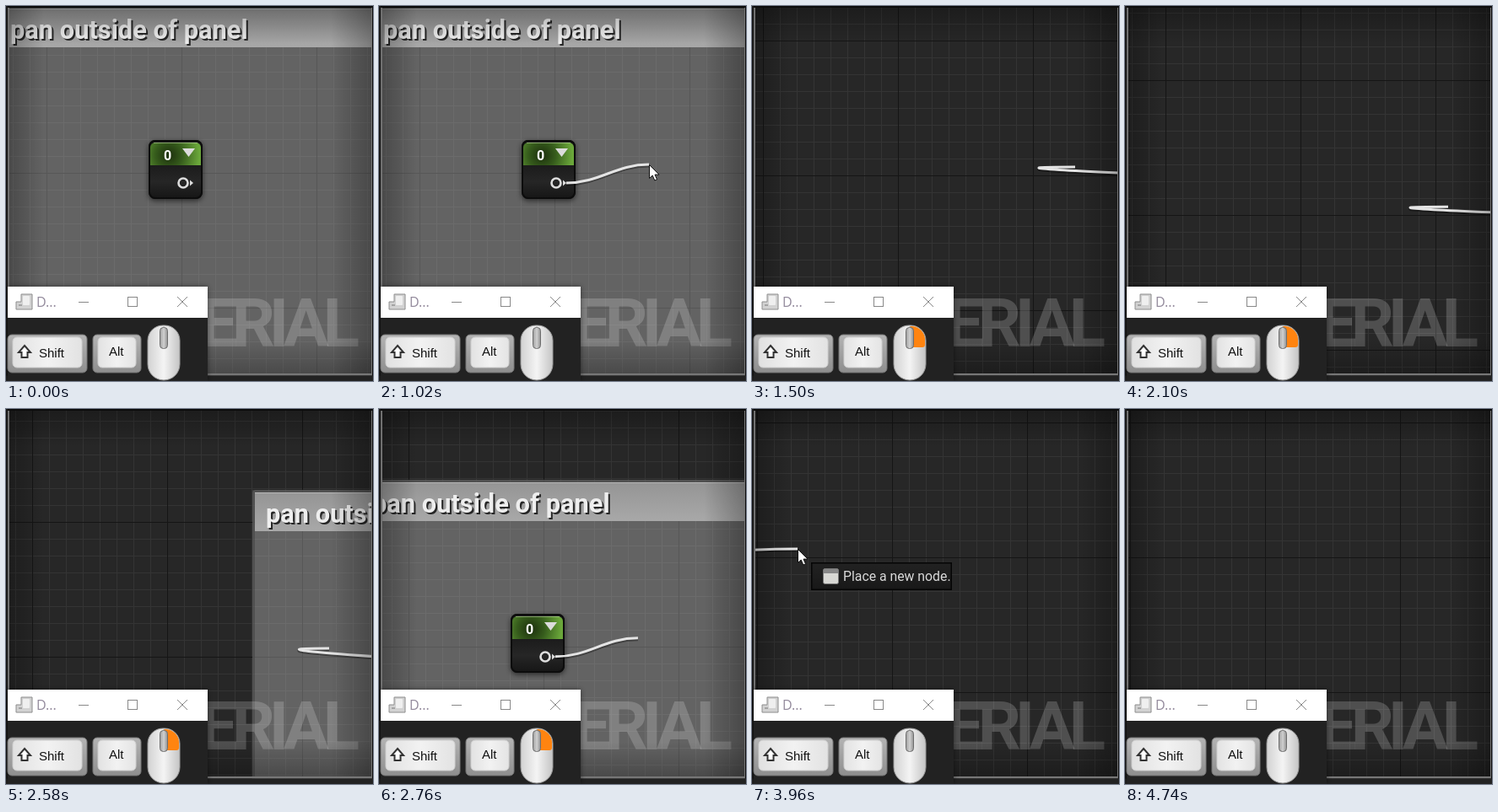
Animation of 435 by 445 pixels, one loop 5340 ms. Source, as an HTML page with a canvas:

```html
<!DOCTYPE html>
<html lang="en">
<head>
<meta charset="utf-8">
<title>Panning with an open wire</title>
<style>
html, body { margin: 0; width: 100%; height: 100%; overflow: hidden; background: #111; }
canvas { display: block; }
</style>
</head>
<body>
<canvas id="stage" width="435" height="445"></canvas>
<script>
const ctx = document.getElementById('stage').getContext('2d');
const LOOP = 5340, STEP = 60;
const VIEW = { left: 4, top: 2, right: 433, bottom: 436 };
const PIN = { x: 222, y: 210 }, DROP = { x: 320, y: 188 };

// Keys are [time, x, y].
const PAN = [[1080, 0, 0], [1500, 445, 3], [1920, 520, 40], [2580, 303, 96],
  [3000, -500, 65], [3360, -530, -10], [3540, -530, -10], [3600, -522, -22]];
const CURSOR_IN = [[60, 428, 71], [480, 214, 210], [720, 214, 210], [1020, 320, 188]];
const CURSOR_OUT = [[3960, 54, 166], [4260, 144, 156], [4680, 183, 107]];

const between = (t, a, b) => t >= a && t < b;
const clamp = (v, lo, hi) => Math.min(hi, Math.max(lo, v));

function follow(keys, t) {
  const next = keys.findIndex(k => k[0] > t);
  if (next < 1) {
    const [, x, y] = next ? keys[keys.length - 1] : keys[0];
    return { x, y };
  }
  const [t0, x0, y0] = keys[next - 1], [t1, x1, y1] = keys[next];
  const u = (t - t0) / (t1 - t0), e = u * u * (3 - 2 * u);
  return { x: x0 + (x1 - x0) * e, y: y0 + (y1 - y0) * e };
}

function rect(x, y, w, h, fill) {
  ctx.fillStyle = fill;
  ctx.fillRect(x, y, w, h);
}

function box(x, y, w, h, r, fill, stroke, width = 1) {
  ctx.beginPath();
  ctx.roundRect(x, y, w, h, r);
  if (fill) { ctx.fillStyle = fill; ctx.fill(); }
  if (stroke) { ctx.strokeStyle = stroke; ctx.lineWidth = width; ctx.stroke(); }
}

function poly(points, fill, stroke, width = 1) {
  ctx.beginPath();
  for (let i = 0; i < points.length; i += 2) ctx.lineTo(points[i], points[i + 1]);
  ctx.closePath();
  if (fill) { ctx.fillStyle = fill; ctx.fill(); }
  if (stroke) { ctx.strokeStyle = stroke; ctx.lineWidth = width; ctx.stroke(); }
}

function line(x0, y0, x1, y1, color, width = 1) {
  ctx.beginPath();
  ctx.moveTo(x0, y0);
  ctx.lineTo(x1, y1);
  ctx.strokeStyle = color;
  ctx.lineWidth = width;
  ctx.stroke();
}

function text(str, x, y, font, color) {
  ctx.font = font;
  ctx.fillStyle = color;
  ctx.fillText(str, x, y);
}

function blend(x0, y0, x1, y1, ...colors) {
  const g = ctx.createLinearGradient(x0, y0, x1, y1);
  colors.forEach((c, i) => g.addColorStop(i / (colors.length - 1), c));
  return g;
}

function grid(pan) {
  rect(0, 0, 435, 445, '#272727');
  const wrap = (v, n) => ((Math.round(v) % n) + n) % n;
  for (const [gap, color] of [[20, '#343434'], [160, '#151515']]) {
    for (let x = wrap(208 + pan.x, gap); x < 435; x += gap) rect(x, 0, 1, 445, color);
    for (let y = wrap(198 + pan.y, gap); y < 445; y += gap) rect(0, y, 435, 1, color);
  }
}

function comment() {
  box(-11, 0, 500, 480, 4, 'rgba(200,200,200,.37)');
  ctx.lineWidth = 3;
  ctx.strokeStyle = 'rgba(70,70,70,.6)';
  ctx.strokeRect(-9.5, 1.5, 497, 477);
  rect(-8, 3, 494, 46, blend(0, 3, 0, 49, '#959595', '#a8a8a8'));
  rect(-8, 3, 494, 1, '#b8b8b8');
  const font = 'bold 30.8px Roboto, sans-serif';
  text('pan outside of panel', 7, 41, font, '#262626');
  text('pan outside of panel', 5, 39, font, '#eeeeee');
}

function node() {
  ctx.save();
  ctx.shadowColor = 'rgba(0,0,0,.6)';
  ctx.shadowBlur = 6;
  ctx.shadowOffsetY = 2;
  box(169, 159, 64, 70, 8, '#111');
  ctx.restore();
  box(170, 160, 62, 68, 7, blend(0, 189, 0, 228, '#1c1c1c', '#262626', '#161616'), '#0c0c0c', 2);
  const green = ctx.createRadialGradient(193, 177, 3, 193, 177, 36);
  green.addColorStop(0, '#20360f');
  green.addColorStop(.4, '#365c1c');
  green.addColorStop(1, '#6aa63a');
  box(171, 162, 60, 27, [6, 6, 0, 0], green);
  rect(175, 162, 52, 1, 'rgba(210,235,180,.5)');
  text('0', 187, 183, 'bold 16px Roboto, sans-serif', '#fff');
  poly([209, 169, 224, 169, 216.5, 179], '#dcdcdc');
  ctx.beginPath();
  ctx.arc(210, 210, 5.5, 0, 7);
  ctx.lineWidth = 2.6;
  ctx.strokeStyle = '#dedede';
  ctx.stroke();
  poly([218, 206.5, 222, 210, 218, 213.5], '#dedede');
}

function wire(from, to) {
  const dx = to.x - from.x, dy = Math.abs(to.y - from.y);
  const reach = dx >= 0 ? (dx + dy) / 3 : 107 - .41 * dx;
  for (const [drop, width, color] of [[1.5, 4, 'rgba(0,0,0,.35)'], [0, 3, '#e4e4e4']]) {
    ctx.beginPath();
    ctx.moveTo(from.x, from.y + drop);
    ctx.bezierCurveTo(from.x + reach, from.y + drop, to.x - reach, to.y + drop, to.x, to.y + drop);
    ctx.lineWidth = width;
    ctx.strokeStyle = color;
    ctx.stroke();
  }
}

function frame() {
  const dark = 'rgba(0,0,0,.28)', clear = 'rgba(0,0,0,0)';
  rect(0, 0, 435, 45, blend(0, 0, 0, 45, dark, clear));
  rect(0, 395, 435, 50, blend(0, 440, 0, 395, dark, clear));
  rect(0, 0, 45, 445, blend(0, 0, 45, 0, dark, clear));
  rect(385, 0, 50, 445, blend(435, 0, 385, 0, dark, clear));
  rect(0, 0, 435, 2, '#0b0b0b');
  rect(0, 0, 2, 445, '#171717');
  rect(2, 2, 2, 436, '#707070');
  rect(433, 2, 1, 436, '#777');
  rect(434, 0, 1, 445, '#0b0b0b');
  rect(2, 436, 432, 2.5, '#777');
  rect(0, 438.5, 435, 7, '#222');
}

function keycap(x, w, label, labelX, labelY) {
  box(x, 390, w, 45, 5, blend(0, 390, 0, 435, '#b4b4b4', '#8e8e8e'), '#777');
  box(x + 6, 393, w - 12, 36, 5, blend(x, 0, x + w, 0, '#dedede', '#f2f2f2', '#e0e0e0'), '#cfcfcf');
  text(label, labelX, labelY, '15px "Liberation Sans", Arial, sans-serif', '#111');
}

function mouse(button) {
  box(168, 379, 38, 65, [18, 18, 19, 19], blend(168, 0, 206, 0, '#d2d2d2', '#f4f4f4', '#c4c4c4'), '#999');
  if (button === 'right') box(187, 380, 18, 25, [0, 16, 3, 0], '#ff8410');
  if (button === 'left') box(169, 380, 18, 25, [16, 0, 0, 3], '#ff8410');
  line(187, 380, 187, 404, '#aaa');
  box(182.5, 381.5, 9, 25, 4, blend(182, 0, 192, 0, '#999', '#d0d0d0', '#8a8a8a'), '#6d6d6d');
}

function keyWindow(button) {
  ctx.save();
  ctx.shadowColor = 'rgba(0,0,0,.5)';
  ctx.shadowBlur = 6;
  rect(2, 333, 237, 112, '#222');
  ctx.restore();
  rect(2, 333, 237, 37, '#fff');
  poly([18, 342, 31, 342, 31, 360, 12, 360, 12, 351, 18, 351], '#d2d2d2', '#8d8d8d');
  box(20, 344, 8, 11, 1, '#efefef');
  line(15, 355, 19, 355, '#777');
  text('D...', 36, 357, '16px "Open Sans", sans-serif', '#938a9c');
  line(86, 351.5, 98, 351.5, '#888');
  ctx.strokeRect(144.5, 345.5, 11, 11);
  line(203, 345, 215, 357, '#888');
  line(215, 345, 203, 357, '#888');
  keycap(2, 94, 'Shift', 39, 417);
  poly([22, 403, 29, 411, 25.5, 411, 25.5, 417, 18.5, 417, 18.5, 411, 15, 411], '#fff', '#333', 2);
  keycap(103, 57, 'Alt', 122, 415);
  mouse(button);
}

function tooltip(x, y) {
  ctx.save();
  ctx.translate(x, y);
  rect(0, 0, 167, 33, '#050505');
  rect(1.5, 1.5, 164, 30, blend(0, 0, 0, 33, '#222', '#181818'));
  box(14.5, 7.5, 18, 18, 2, '#d8d8d4', '#777');
  rect(15, 8, 17, 5, '#888');
  text('Place a new node.', 38, 22, '15.8px Roboto, sans-serif', '#dadada');
  ctx.restore();
}

function arrow(x, y) {
  ctx.save();
  ctx.translate(x + .5, y + .5);
  poly([0, 0, 0, 16, 3.7, 12.6, 6.3, 18.5, 9, 17.3, 6.5, 11.6, 11.5, 11.6], '#fff', '#111');
  ctx.restore();
}

function draw(t) {
  const pan = follow(PAN, t);
  const panning = between(t, 1080, 3840);
  const cursor = between(t, 60, 1080) ? follow(CURSOR_IN, t)
    : between(t, 3840, 4740) ? follow(CURSOR_OUT, t) : null;
  const clicking = between(t, 720, 780) || between(t, 4560, 4680);

  grid(pan);
  ctx.save();
  ctx.translate(Math.round(pan.x), Math.round(pan.y));
  comment();
  node();
  ctx.restore();
  if (between(t, 780, 4740)) {
    // While panning, the loose end stays 50px inside the viewport.
    const end = cursor || {
      x: clamp(DROP.x + pan.x, VIEW.left + 50, VIEW.right - 50),
      y: DROP.y + pan.y
    };
    wire({ x: PIN.x + pan.x, y: PIN.y + pan.y }, end);
  }

  ctx.textAlign = 'right';
  ctx.letterSpacing = '-7px';
  text('MATERIAL', 412, 404, 'bold 80px Roboto, sans-serif', 'rgba(255,255,255,.19)');
  ctx.letterSpacing = '0px';
  ctx.textAlign = 'left';

  frame();
  keyWindow(panning ? 'right' : clicking ? 'left' : '');
  if (cursor) {
    if (t >= 3840) tooltip(cursor.x + 16, cursor.y + 16);
    arrow(cursor.x, cursor.y);
  }
}

const start = performance.now();
function tick() {
  const t = (performance.now() - start) % LOOP;
  draw(Math.floor(t / STEP) * STEP);
  requestAnimationFrame(tick);
}
tick();
</script>
</body>
</html>
```
